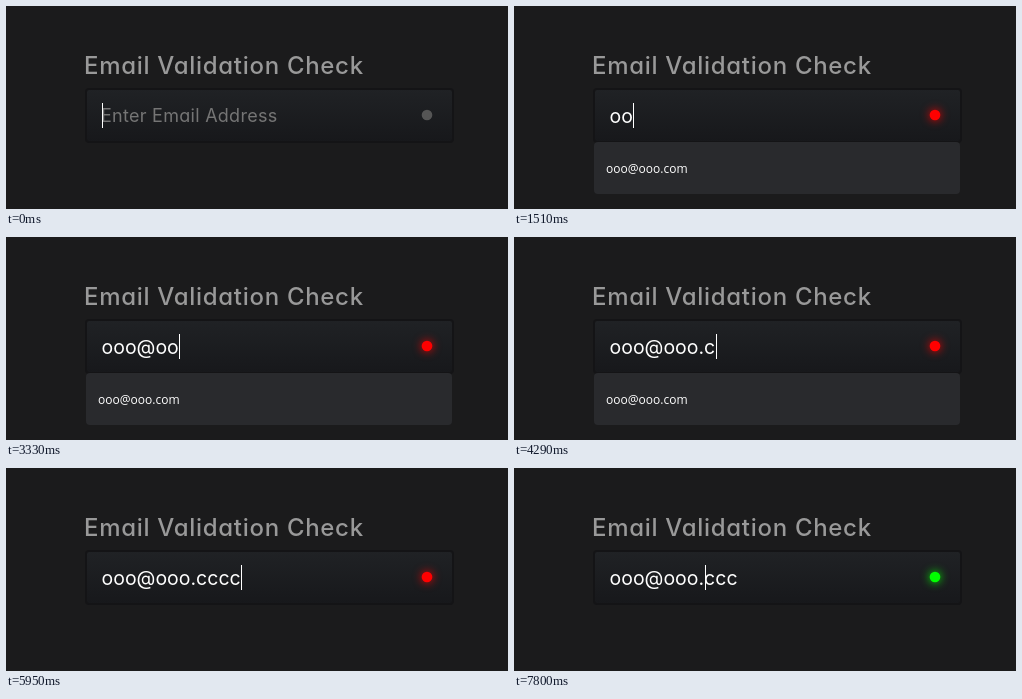
An HTML page for the animation above (8 s loop, 502 by 203 pixels).

```html
<!DOCTYPE html>
<html lang="en">
<head>
<meta charset="utf-8">
<title>Email Validation Check</title>
<style>
  html, body { margin: 0; width: 100%; height: 100%; overflow: hidden; background: #1b1b1c; }
  svg { display: block; }
  text { font-family: Inter, sans-serif; font-feature-settings: "cv11"; white-space: pre; }
  #title { font-size: 24px; font-weight: 500; letter-spacing: .7px; fill: #999; }
  #placeholder { font-size: 18px; letter-spacing: .27px; fill: #757575; }
  #typed { font-size: 19.5px; fill: #fff; }
  #menu text { font: 12px "Open Sans", sans-serif; fill: #fff; }
  #dot { fill: #555; }
  #dot.bad { fill: #f00; --glow: #f00; }
  #dot.good { fill: #0f0; --glow: #0f0; }
  #dot.bad, #dot.good { filter: drop-shadow(0 0 5px var(--glow)); }
</style>
</head>
<body>
<svg width="502" height="203" viewBox="0 0 502 203">
  <defs>
    <linearGradient id="fieldFill" x1="0" y1="0" x2="0" y2="1">
      <stop offset="0" stop-color="#202225"/>
      <stop offset="1" stop-color="#17181b"/>
    </linearGradient>
  </defs>
  <text id="title" x="78" y="68">Email Validation Check</text>
  <rect x="80" y="83" width="367" height="53" rx="3" fill="url(#fieldFill)" stroke="#141416" stroke-width="2"/>
  <text id="placeholder" x="95" y="116">Enter Email Address</text>
  <text id="typed" x="95.5" y="116.5"></text>
  <rect id="caret" y="97" width="1" height="25" fill="#fff"/>
  <circle id="dot" cx="421" cy="109" r="5.3"/>
  <g id="menu">
    <rect x="80" y="136" width="366" rx="4" fill="#292a2d"/>
    <text x="92" y="167"></text>
    <text x="92" y="203"></text>
  </g>
</svg>
<script>
const DURATION = 8000;
const ADDRESS = 'ooo@ooo.cccc';
const SUGGESTIONS = ['oun5846@ovdun.com', 'ooo@ooo.com'];
const $ = id => document.getElementById(id);

// Each step changes some of: length typed, caret index, caret visibility, dot state, suggestions.
const type = n => ({ length: n, index: n, caret: true });
const blink = caret => ({ caret });
const moveTo = index => ({ index, caret: true });
const steps = [
  [0, { ...type(0), dot: '', menu: [] }],
  [30, blink(false)],
  [520, blink(true)],
  [720, type(1)],
  [750, { menu: SUGGESTIONS }],
  [830, { dot: 'bad' }],
  [1240, blink(false)],
  [1510, { ...type(2), menu: SUGGESTIONS.slice(1) }],
  [1820, type(3)],
  [2350, blink(false)],
  [2560, type(4)],
  [3050, type(5)],
  [3330, type(6)],
  [3560, type(7)],
  [3950, type(8)],
  [4290, type(9)],
  [4700, { ...type(10), menu: [] }],
  [4830, { dot: 'good' }],
  [5170, type(11)],
  [5640, blink(false)],
  [5840, type(12)],
  [5950, { dot: 'bad' }],
  [6340, blink(false)],
  [6500, { length: 11, index: 11 }],
  [6670, { dot: 'good' }],
  [6880, blink(true)],
  [7410, blink(false)],
  [7520, moveTo(10)],
  [7640, moveTo(9)],
  [7800, moveTo(8)]
];

const menuBox = $('menu').querySelector('rect');
const menuRows = $('menu').querySelectorAll('text');

function render(time) {
  const state = Object.assign({}, ...steps.filter(([at]) => at <= time).map(([, change]) => change));
  const { length, index, caret, dot, menu } = state;

  $('typed').textContent = ADDRESS.slice(0, length);
  $('placeholder').style.display = length ? 'none' : '';
  const offset = index ? $('typed').getSubStringLength(0, index) : 0;
  $('caret').setAttribute('x', Math.round(96 + offset));
  $('caret').style.display = caret ? '' : 'none';
  $('dot').setAttribute('class', dot);

  $('menu').style.display = menu.length ? '' : 'none';
  menuBox.setAttribute('height', 16 + 36 * menu.length);
  menuRows.forEach((row, i) => { row.textContent = menu[i] || ''; });
}

const start = performance.now();
function tick() {
  render((performance.now() - start) % DURATION);
  requestAnimationFrame(tick);
}
tick();
</script>
</body>
</html>
```
